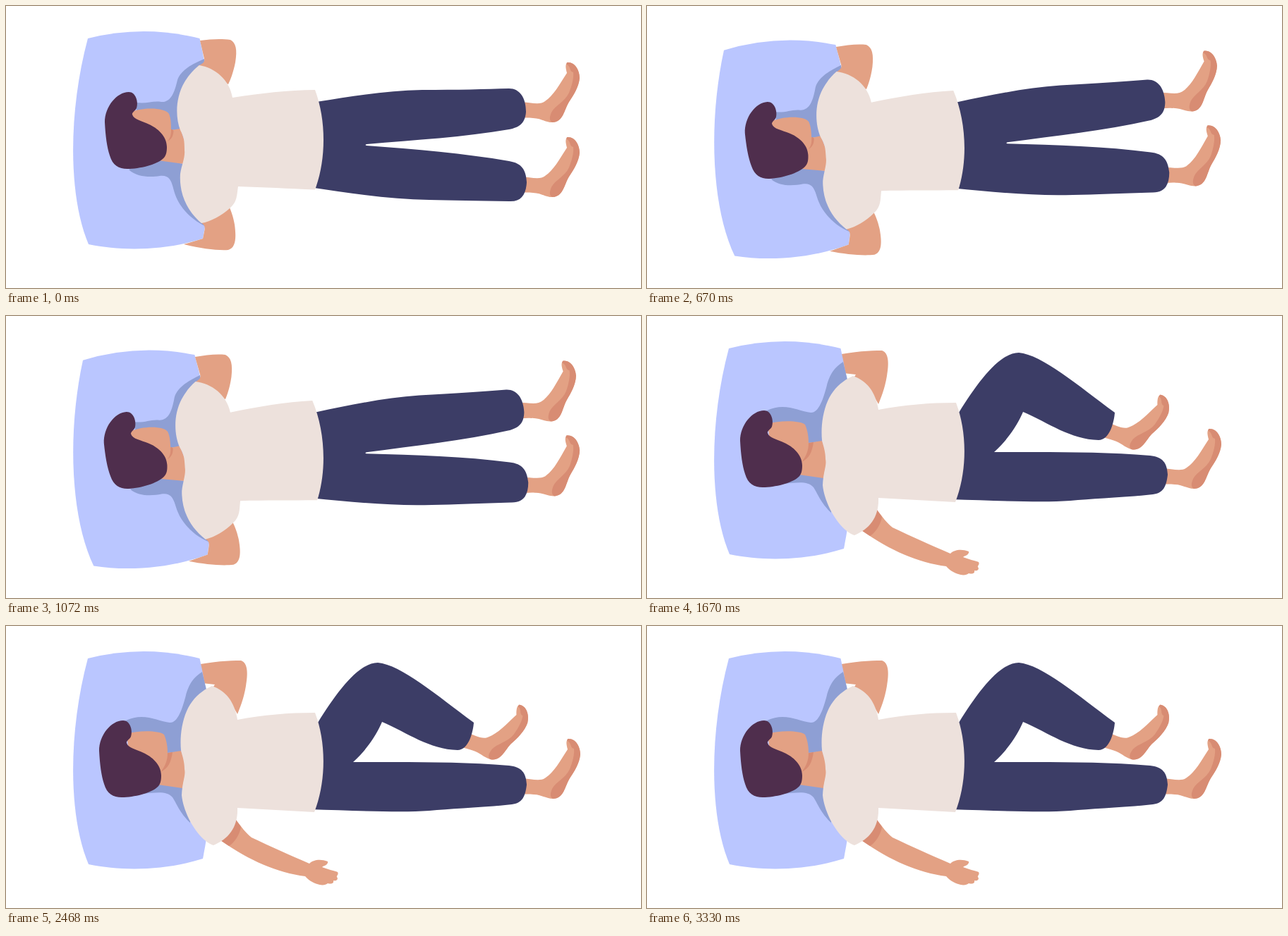
Animation of 900x400 px, one loop 4 s. Source, as an HTML page:

```html
<!DOCTYPE html>
<html lang="en">
<head>
<meta charset="utf-8">
<title>Sleeper</title>
<style>
  html, body { margin: 0; width: 100%; height: 100%; overflow: hidden; background: #fff; }
  svg { display: block; width: 100%; height: 100%; }
  .pillow { fill: #bac6ff; }
  .shade { fill: #8e9fd4; }
  .skin { fill: #e3a184; }
  .tan { fill: #d88c73; }
  .hair { fill: #4f2e4d; }
  .shirt { fill: #ede1dc; }
  .pants { fill: #3c3d66; }
</style>
</head>
<body>
<svg viewBox="0 0 900 400">
  <defs>
    <path id="pillow" class="pillow" d="M116 46Q195 26 274.5 46C296 140 297 240 279 330C225 347 165 348 117 338C88 270 88 150 116 46Z"/>
    <path id="hair" class="hair" d="M140 165C140 143 157 122 174 122C184 122 188 136 185 145C183 149 178 151 179 154C181 161 193 163 203 168C214 173 228 184 228 200C228 207 227 213 222 217C213 225 190 231 172 231C160 231 151 226 147 212C143 200 141 184 140 165Z"/>
    <g id="foot">
      <path class="skin" d="M728 136C745 137 757 141 764 135C776 127 784 112 795 95C793 88 792 81 797 80C807 80 813 92 813 102C812 115 804 127 798 136C791 147 790 165 774 165C765 165 757 159 747 159C740 158 735 159 728 158Z"/>
      <path class="tan" d="M795 80C807 79 813 92 813 102C812 115 804 127 798 136C791 147 790 165 774 165C769 162 771 156 773 151C778 141 792 136 798 123C802 113 805 102 804 94C800 93 800 90 799 88C798 85 796 83 794 83Z"/>
    </g>
  </defs>

  <g id="straight">
    <use href="#pillow"/>
    <path class="shade" d="M281 75C262 83 247 92 243 105C239 122 234 137 220 136C208 134 200 139 185 137L185 152L230 175L248 177L262 110L281 86Z"/>
    <path class="shade" d="M174 232C185 243 205 243 218 241C236 239 235 255 240 268C246 285 262 303 282 312L276 300L255 225L215 216Z"/>
    <path class="skin" d="M275 49C290 47 305 46 318 48C326 52 328 62 325 80C322 95 318 105 315 111L290 100L272 85C279 82 282 79 281 75Z"/>
    <path class="skin" d="M252 338C275 344 300 347 315 346C327 343 326 325 324 310C322 298 319 291 317 286L276 300L276 307C283 311 282 315 281 320L279 330Z"/>
    <path class="skin" d="M178 150C195 143 226 144 231 153C234 160 234 168 234 176L247 174L256 200L252 224L215 219L180 190Z"/>
    <path class="tan" d="M234 175C237 175 238 176 237 181C236 186 234 189 229 192C233 187 234 183 234 175Z"/>
    <use href="#hair"/>
    <use href="#foot"/>
    <use href="#foot" y="106"/>
    <path class="pants" d="M430 138L443 135.5C490 128 540 120 590 119C640 119 680 118 713 117C728 117 737 130 737 150C736 165 729 172 713 175C650 186 580 190 511 196Q508 197 511 198C580 203 650 209 713 220C731 223 737 232 738 250C737 268 730 278 713 277C670 276 630 276 600 275C545 274 490 266 430 257Z"/>
    <path class="shirt" d="M274 84C297 88 317 105 321 130C360 124 400 119 438 119C454 162 454 218 438 260.5C400 259 365 257 329 256C327 268 328 278 317 287C306 297 290 306 277 308C258 292 245 268 247 238C249 225 254 215 253 205C253 190 252 185 247 176C240 158 240 130 253 108C259 98 267 89 274 84Z"/>
  </g>

  <g id="bent">
    <path class="skin" d="M265 56C295 50 315 49 333 49C343 52 343 68 340 85C337 103 332 115 328 125C318 105 300 92 294 86L296 83L278 81Z"/>
    <path class="skin" d="M304 304L326 275C333 284 340 294 348 300C375 313 405 326 430 337C435 332 445 330 456 334C457 339 450 340 448 342C455 345 465 347 470 349C472 353 468 354 469 356C472 360 467 362 464 361C465 366 460 366 456 365C453 368 446 368 441 366C435 364 428 360 424 355C385 350 345 333 304 304Z"/>
    <path class="tan" d="M304 304L326 275L333 285C331 297 323 308 316 312Z"/>
    <use href="#pillow"/>
    <path class="shade" d="M278 65C262 75 258 88 255 98C250 118 243 138 232 137C215 135 195 122 170 134L176 155L228 180L248 178L262 110L284 90Z"/>
    <path class="shade" d="M194 238C215 236 228 234 236 243C242 252 246 265 261 279L262 250L250 226L212 222Z"/>
    <path class="skin" d="M171 153C188 148 216 148 224 154C228 163 229 172 229 180L248 177L256 200L250 230L215 225L176 195Z"/>
    <path class="tan" d="M229 180L236 179C234 193 230 202 219 207C226 199 229 190 229 180Z"/>
    <use href="#hair" x="-8" y="12"/>
    <use href="#foot" transform="translate(729 112) rotate(14) translate(-797 -80)"/>
    <use href="#foot" x="1" y="80"/>
    <path class="pants" d="M430 150L442 137C470 92 500 52 527 52C560 55 610 98 663 137C662 150 656 176 640 176C600 175 570 152 533 136C527 150 515 172 492 193C570 193 640 192 713 198C731 200 737 208 738 225C736 242 732 251 717 253C670 258 630 259 600 262C560 265 500 262 430 260Z"/>
    <path class="shirt" d="M292 85C312 92 324 108 328 133C365 126 400 123 438 123C454 165 454 220 437 264C400 262 365 260 328 258C329 285 316 302 294 311C275 305 252 270 249 240C250 220 255 212 253 203C253 192 250 185 248 176C246 155 250 125 264 107C272 96 283 89 292 85Z"/>
  </g>
</svg>
<script>
  const LOOP = 4000;
  const poses = {
    straight: document.getElementById('straight'),
    bent: document.getElementById('bent')
  };
  // start ms, pose, rotation
  const steps = [
    [0, 'straight', ''],
    [670, 'straight', 'rotate(-2.8 457 197)'],
    [1340, 'straight', ''],
    [1670, 'bent', ''],
    [3000, 'bent', 'rotate(1.45 438 195)'],
    [3330, 'bent', '']
  ];

  function draw() {
    const t = performance.now() % LOOP;
    const [, pose, turn] = steps.filter(s => s[0] <= t).pop();
    for (const name in poses) {
      poses[name].style.display = name === pose ? '' : 'none';
    }
    poses[pose].setAttribute('transform', turn);
    requestAnimationFrame(draw);
  }
  draw();
</script>
</body>
</html>
```
